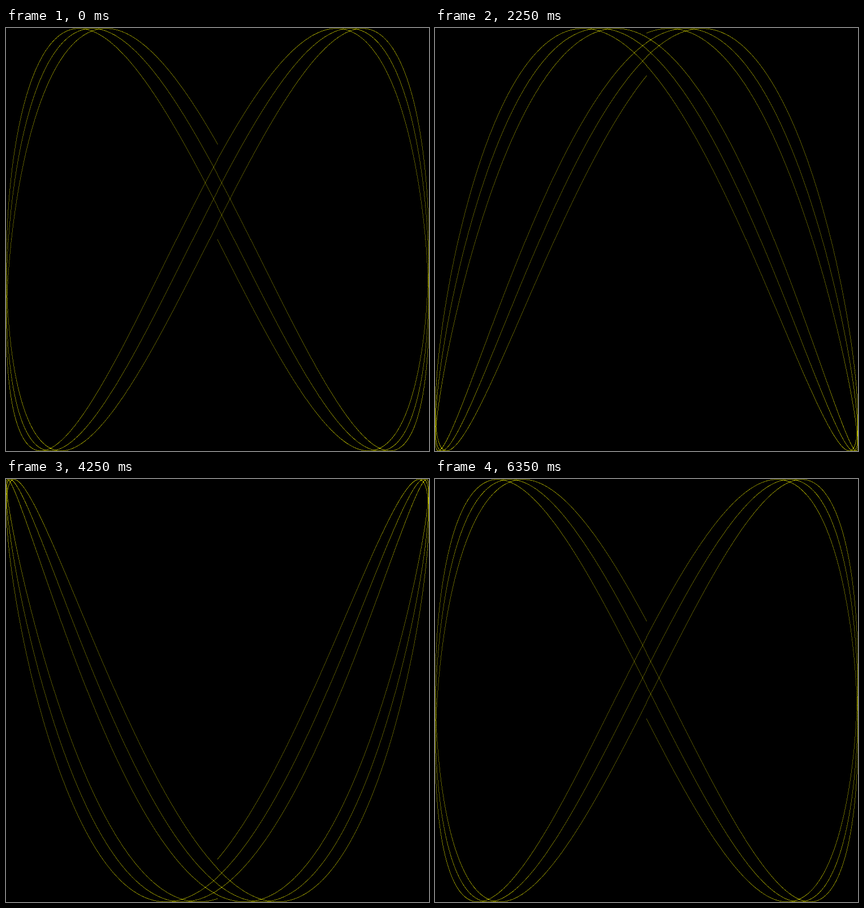
Recreate the animation shown at these times as an HTML page with a canvas. Size 748 px wide and 748 px high, loop 6.4 s.

```html
<!DOCTYPE html>
<html lang="en">
<head>
<meta charset="utf-8">
<title>Lissajous</title>
<style>
html, body { margin: 0; width: 100%; height: 100%; overflow: hidden; background: #000; }
canvas { display: block; }
</style>
</head>
<body>
<canvas id="stage" width="748" height="748"></canvas>
<script>
const STAGE = 748;
const SIZE = 748;                      // amplitude on the fine plotting grid
const DOT = STAGE / (2 * SIZE + 1);    // one grid cell in stage pixels
const FRAMES = 128;
const DELAY = 50;
const CYCLES = 3;
const STEP = 0.001;
const FREQ = 1.97517;
const PHASE_STEP = 0.1;

const ctx = document.getElementById('stage').getContext('2d');
const toCell = v => SIZE + Math.trunc(v * SIZE + 0.5);

function draw(frame) {
  const phase = frame * PHASE_STEP;
  ctx.globalCompositeOperation = 'source-over';
  ctx.fillStyle = '#000';
  ctx.fillRect(0, 0, STAGE, STAGE);

  // Small dots add up to soft lines that are dimmer where the curve runs fast.
  ctx.globalCompositeOperation = 'lighter';
  ctx.fillStyle = '#ff0';
  let lastX = -1, lastY = -1;
  for (let t = 0; t < CYCLES * 2 * Math.PI; t += STEP) {
    const x = toCell(Math.sin(t));
    const y = toCell(Math.sin(t * FREQ + phase));
    if (x === lastX && y === lastY) continue;
    ctx.fillRect(x * DOT, y * DOT, DOT, DOT);
    lastX = x;
    lastY = y;
  }
}

const start = performance.now();
let shown = -1;

function tick() {
  const frame = Math.floor((performance.now() - start) / DELAY) % FRAMES;
  if (frame !== shown) draw(shown = frame);
  requestAnimationFrame(tick);
}
tick();
</script>
</body>
</html>
```
